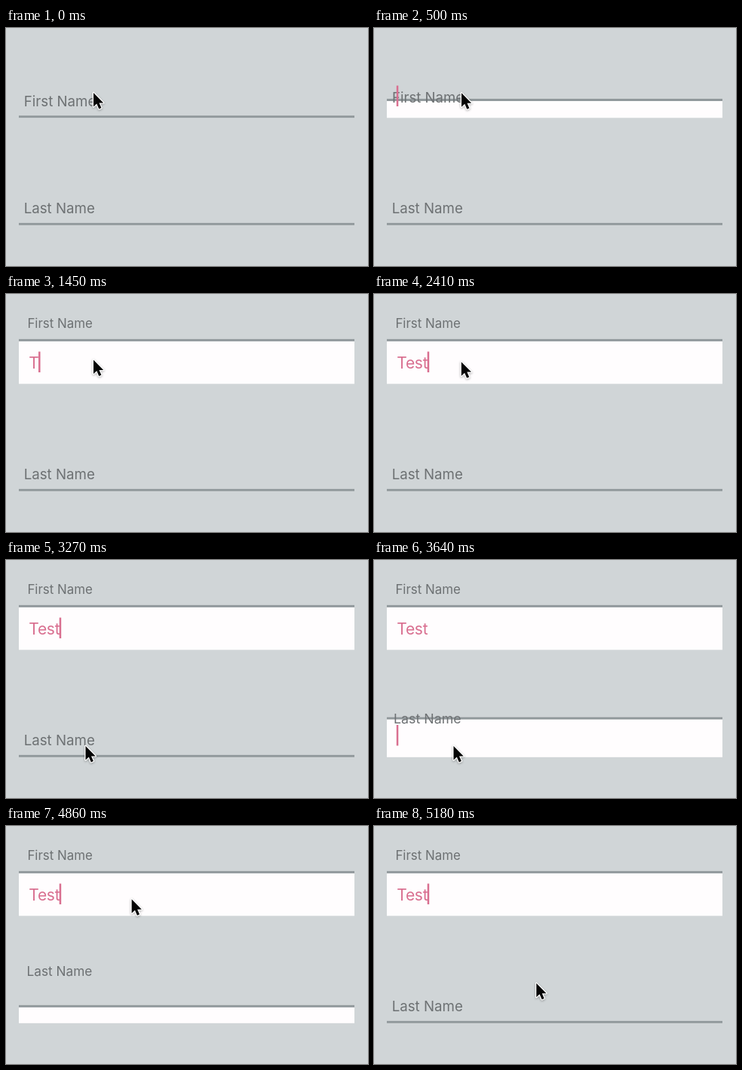
Write an HTML page with a canvas that moves like this. It is 480 by 316 pixels and loops after 5.22 s.

```html
<!DOCTYPE html>
<html lang="en">
<head>
<meta charset="utf-8">
<title>Floating label fields</title>
<style>
  html, body { margin: 0; width: 100%; height: 100%; overflow: hidden; background: #d0d5d7; }
  canvas { display: block; }
</style>
</head>
<body>
<canvas id="stage" width="480" height="316"></canvas>
<script>
const ctx = document.getElementById('stage').getContext('2d');
const LOOP = 5220;
const PINK = '#d96f90';

const clamp = v => Math.min(1, Math.max(0, v));
const span = (t, from, to) => clamp((t - from) / (to - from));
const mix = (a, b, p) => a + (b - a) * p;

// CSS-style cubic-bezier timing, solved by bisection
function bezier(x1, y1, x2, y2) {
  const curve = (a, b, u) => 3 * a * u * (1 - u) ** 2 + 3 * b * u * u * (1 - u) + u ** 3;
  return x => {
    if (x <= 0 || x >= 1) return clamp(x);
    let low = 0, high = 1;
    for (let i = 0; i < 24; i++) {
      const mid = (low + high) / 2;
      if (curve(x1, x2, mid) < x) low = mid; else high = mid;
    }
    return curve(y1, y2, low);
  };
}
const ease = bezier(.25, .1, .25, 1);
const easeInOut = bezier(.42, 0, .58, 1);
const easeIn = bezier(.42, 0, 1, 1);
const easeOut = bezier(0, 0, .58, 1);

const fields = [
  { label: 'First Name', top: 0, open: 440, close: Infinity },
  { label: 'Last Name', top: 142.5, open: 3490, close: 4770 }
];

const keys = [[1450, 'T'], [1590, 'Te'], [1820, 'Tes'], [2050, 'Test']];

// start, end, x, y, easing
const moves = [
  [440, 640, 116, 87.5, easeInOut],
  [2365, 2860, 105.5, 247, easeInOut],
  [4070, 4270, 135, 142.5, easeIn],
  [4270, 4600, 163.5, 90, easeOut],
  [4790, 5200, 215.5, 209.3, easeInOut]
];

// start, end, opacity reached
const fades = [
  [440, 441, 1], [1070, 1180, 0], [1449, 1450, 1], [2690, 2790, 0],
  [3160, 3270, 1], [4130, 4230, 0], [4769, 4770, 1]
];

function drawField({ label, top, open, close }, t) {
  const progress = (timing, length) =>
    timing(span(t, open, open + length)) - timing(span(t, close, close + length));
  const border = mix(116.2, 59.7, progress(ease, 250));
  const lift = progress(easeInOut, 300);

  ctx.save();
  ctx.translate(0, top);
  ctx.fillStyle = '#fffdfe';
  ctx.fillRect(17, border, 445, 119.3 - border);
  ctx.fillStyle = '#90989b';
  ctx.fillRect(17, border, 445, 3.1);
  ctx.fillStyle = '#6d7173';
  ctx.font = `${mix(18.7, 16.9, lift)}px Inter, sans-serif`;
  ctx.fillText(label, mix(23.7, 28.4, lift), mix(103.6, 45.1, lift));
  ctx.restore();
}

function drawInput(t) {
  const text = keys.reduce((typed, [at, value]) => t >= at ? value : typed, '');
  const inSecond = t >= 3490 && t < 4770;
  ctx.fillStyle = PINK;
  ctx.font = '21px Inter, sans-serif';
  ctx.letterSpacing = '-0.3px';
  ctx.fillText(text, 30.3, 98.5);
  const width = inSecond ? 0 : ctx.measureText(text).width;
  ctx.letterSpacing = '0px';

  ctx.globalAlpha = fades.reduce((alpha, [from, to, goal]) => mix(alpha, goal, span(t, from, to)), 0);
  ctx.fillRect(29.8 + width, inSecond ? 219 : 76.5, 2.5, 27.5);
  ctx.globalAlpha = 1;
}

const arrow = new Path2D('M0 0V18.5L4.3 14.5L7.3 21.4L10.4 20.1L7.5 13.4H13.2Z');

function drawPointer(t) {
  let x = 116, y = 86;
  for (const [from, to, toX, toY, timing] of moves) {
    const p = timing(span(t, from, to));
    x = mix(x, toX, p);
    y = mix(y, toY, p);
  }
  ctx.save();
  ctx.translate(x, y);
  ctx.lineJoin = 'round';
  ctx.lineWidth = 2.6;
  ctx.strokeStyle = '#fff';
  ctx.shadowColor = 'rgba(0, 0, 0, .3)';
  ctx.shadowBlur = 3;
  ctx.shadowOffsetY = 1;
  ctx.stroke(arrow);
  ctx.shadowColor = 'transparent';
  ctx.fillStyle = '#050505';
  ctx.fill(arrow);
  ctx.restore();
}

function render() {
  const t = performance.now() % LOOP;
  ctx.fillStyle = '#d0d5d7';
  ctx.fillRect(0, 0, 480, 316);
  fields.forEach(field => drawField(field, t));
  drawInput(t);
  drawPointer(t);
  requestAnimationFrame(render);
}
render();
</script>
</body>
</html>
```
